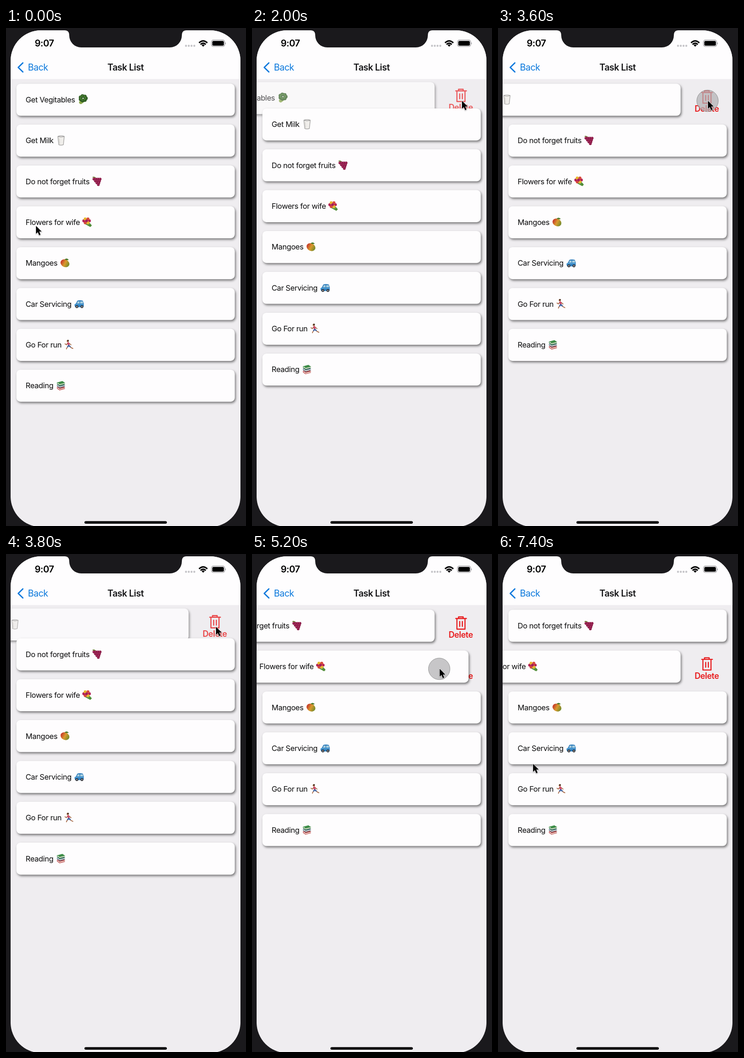
These frames come from a looping animation (520 by 1077 pixels, 7500 ms). An HTML page:

```html
<!DOCTYPE html>
<html lang="en">
<head>
<meta charset="utf-8">
<title>Task List</title>
<style>
  html, body { margin: 0; width: 100%; height: 100%; overflow: hidden; background: #1a191c; }
  svg { display: block; width: 100%; height: 100%; }
  text { font-family: Inter, "Open Sans", sans-serif; }
  .bold { font-weight: 600; letter-spacing: -.5px; text-anchor: middle; }
  .label { font-size: 16.4px; letter-spacing: -.4px; fill: #0c0c0d; }
  .card { fill: #fefdfe; filter: drop-shadow(2px 3.5px 2.5px rgba(0, 0, 0, .5)); }
  .line { fill: none; stroke-linecap: round; stroke-linejoin: round; }
  #pointer { filter: drop-shadow(0 1px 1px rgba(0, 0, 0, .3)); }
</style>
</head>
<body>
<svg viewBox="0 0 520 1077">
  <defs>
    <clipPath id="screen"><rect x="10" y="5" width="498" height="1074" rx="66"/></clipPath>
    <linearGradient id="mangoSkin">
      <stop offset=".1" stop-color="#c9442c"/>
      <stop offset=".5" stop-color="#d99a2d"/>
      <stop offset="1" stop-color="#6f8a2b"/>
    </linearGradient>
  </defs>
  <rect width="520" height="1077" fill="#1a191c"/>
  <g clip-path="url(#screen)">
    <rect x="10" width="498" height="1077" fill="#efedf0"/>
    <g id="list"></g>
    <rect x="10" width="498" height="110.5" fill="#fefdfe"/>
    <path d="M127 0V5Q137 5 137 16A26 26 0 0 0 163 42H355A26 26 0 0 0 381 16Q381 5 391 5V0Z" fill="#1a191c"/>
    <text x="83" y="40.3" font-size="20" class="bold">9:07</text>
    <path d="M390 38.5H409" class="line" stroke="#c5c4c8" stroke-width="4.4" stroke-dasharray="0 6"/>
    <g fill="none" stroke="#000" stroke-width="3">
      <path d="M418.2 32.2Q427.2 23.6 436.2 32.2M421.5 35.6Q427.2 30.2 432.9 35.6"/>
      <path d="M423.8 37Q427.2 34.2 430.6 37L427.2 40.6Z" fill="#000" stroke="none"/>
    </g>
    <rect x="445.2" y="26.2" width="28.6" height="13.8" rx="4" fill="none" stroke="#8d8c90" stroke-width="1.2"/>
    <rect x="447" y="28" width="25" height="10.2" rx="2.5"/>
    <path d="M475.2 31Q477.5 33 475.2 35.5Z" fill="#8d8c90"/>
    <path d="M36.5 75.5L26.5 85.3L36.5 95" class="line" stroke="#0a78dc" stroke-width="2.8"/>
    <text x="47.5" y="92.2" font-size="19.5" letter-spacing="-.5" fill="#0a78dc">Back</text>
    <text x="259" y="92.2" font-size="19.5" class="bold" fill="#151517">Task List</text>
    <rect x="170" y="1066.5" width="178.5" height="5.500" rx="2.75"/>
    <circle id="touch" r="23.3" fill="#b3b2b5" fill-opacity=".72" stroke="#777" stroke-opacity=".7"/>
    <path id="pointer" d="M0 0V17L4 13.4L6.8 20.2L9.8 19L7 12.3H12.3Z" stroke="#fff" stroke-width="1.3" paint-order="stroke"/>
  </g>
</svg>
<script>
const LOOP = 7500, FRAME = 100, PITCH = 88.35, OPEN = 100;
const SLIDE = 350, DRAG = 230, PRESS = 150, COLLAPSE_DELAY = 171, COLLAPSE = 300;

const repeat = (n, draw) => Array.from({ length: n }, (_, i) => draw(i)).join('');
const dot = (x, y, r, fill) => `<circle cx="${x}" cy="${y}" r="${r}" fill="${fill}"/>`;
const shape = (fill, d) => `<path d="${d}" fill="${fill}"/>`;
const line = (color, width, d) => `<path d="${d}" class="line" stroke="${color}" stroke-width="${width}"/>`;
const ring = (n, cx, cy, spread, r, ...colors) => repeat(n, i => {
  const angle = i * 2 * Math.PI / n;
  return dot(cx + spread * Math.cos(angle), cy + spread * .8 * Math.sin(angle), r, colors[i % colors.length]);
});

// Each icon fits a 22 x 22 box.
const icons = {
  broccoli: shape('#88a647', 'M7 9L3 17Q5 22 9 20L18 13Z')
    + ring(7, 12, 8, 6, 4, '#2f5d24') + ring(7, 11.5, 7, 5.5, 2, '#477b30'),
  milk: shape('#f0eeeb', 'M4 2H18L16 20Q11 22 6 20Z')
    + line('#9d9c9b', 1.2, 'M4 2L6 20Q11 22 16 20L18 2Q11 4.500 4 2Q11 -.5 18 2')
    + line('#d5d2ce', 1.4, 'M7 7L8 18'),
  grapes: line('#6d7a35', 2, 'M2 2Q6 1 8 5')
    + repeat(4, row => repeat(4 - row, col => {
      const x = 4 + 4.5 * col + 3.2 * row, y = 6 + 4 * row;
      return dot(x, y, 3, '#8d1c49') + dot(x - .8, y - .8, 1.1, '#b83d6e');
    })),
  bouquet: repeat(3, i => line('#4d8b35', 2.2, `M${6 + 3 * i} ${14 - 2 * i}L${17 + i} ${20 - i}`))
    + ring(6, 9, 8, 6, 3.2, '#b52355', '#e6b62d', '#d84a3d') + dot(9, 8, 3, '#a31f58'),
  mango: '<ellipse cx="11" cy="11.5" rx="10" ry="8" transform="rotate(28 11 11)" fill="url(#mangoSkin)"/>'
    + shape('#4c7a2a', 'M10 3Q15 -1 19 4Q14 6 10 3Z'),
  car: shape('#327fbd', 'M1 12L4 10L7 4Q12 2 19 4L21 10V16Q20 18 17 18H3Q1 17 1 12Z')
    + shape('#a9cfe0', 'M6 10L8 5.500H19L19.5 10Z') + line('#327fbd', 1.4, 'M12.500 5V10')
    + line('#5eb0e2', 1.2, 'M2 12H20')
    + repeat(2, i => dot(6 + 11 * i, 17, 3, '#29292d') + dot(6 + 11 * i, 17, 1.4, '#b5b7bb')),
  runner: line('#a86b49', 1.8, 'M8 7L5 11L2 9M10 7L15 11M10 13L7 16L5 20M11 13L15 17L19 19')
    + line('#d0476a', 4, 'M9 7.500L10 11') + line('#4669a5', 3, 'M8 15L10 12.500L13 15')
    + dot(8, 3, 2.4, '#a86b49') + dot(8.500, 2, 1.8, '#49301f'),
  books: ['#b8383b', '#4a6c83', '#3e8d48'].map((color, i) => {
    const y = 14 - 5 * i;
    return shape('#efe9dc', `M4 ${y + 2}L8 ${y + 6}L19 ${y + 3}V${y}Z`)
      + shape(color, `M3 ${y}L14 ${y - 3}L20 ${y + 1}L8 ${y + 4}Z`)
      + line(color, 1.2, `M3 ${y}V${y + 3}L8 ${y + 6.5}L19 ${y + 3.5}`);
  }).join('')
};

const tasks = [
  ['Get Vegitables', 'broccoli'], ['Get Milk', 'milk'], ['Do not forget fruits', 'grapes'],
  ['Flowers for wife', 'bouquet'], ['Mangoes', 'mango'], ['Car Servicing', 'car'],
  ['Go For run', 'runner'], ['Reading', 'books']
];
const swipes = [
  { task: 0, at: 400 }, { task: 1, at: 2600 }, { task: 2, at: 4430 },
  { task: 3, at: 5150, row: 1 }, { task: 2, at: 6450, closing: true }
];
const taps = [{ task: 0, at: 1700 }, { task: 1, at: 3520 }];

// The pointer passes through every gesture and a few places between them.
const stop = (t, x, y) => ({ t, x, y });
const route = [
  stop(0, 65, 428), stop(1400, 414, 158), stop(4300, 434, 176),
  stop(6300, 267, 157), stop(7200, 199, 323), stop(7400, 76, 454), stop(LOOP, 76, 454),
  ...swipes.flatMap(({ at, row = 0, closing }) => {
    const ends = closing ? [310, 400] : [420, 310];
    return ends.map((x, i) => stop(at + i * DRAG, x, 160 + row * PITCH));
  }),
  ...taps.flatMap(({ at }) => [stop(at - 100, 455, 157.5), stop(at + 400, 455, 157.5)])
].sort((a, b) => a.t - b.t);
const presses = [...swipes.map(({ at }) => [at, at + DRAG]), ...taps.map(({ at }) => [at, at + PRESS])];

const trash = line('#e81d1f', 2.4, 'M441.500 139.500H464.500M447.500 139V136H457.500V139M444 140V162.500H461.500V140M450 146V156.500M455.800 146V156.500');
const list = document.getElementById('list');
list.innerHTML = tasks.map(([label, icon]) => `<g>
  <g>${trash}<text x="452.3" y="181.3" font-size="18" class="bold" fill="#e81d1f">Delete</text></g>
  <g><rect class="card" x="22.5" y="120.5" width="473.2" height="69.3" rx="9"/>
    <text class="label" x="42.5" y="161">${label}</text>
    <g class="icon">${icons[icon]}</g></g>
</g>`).join('');
const rows = [...list.children];
const touch = document.getElementById('touch');
const pointer = document.getElementById('pointer');

const progress = (t, start, length) => Math.min(1, Math.max(0, (t - start) / length));
const smooth = p => p * p * (3 - 2 * p);
const easeOut = p => 1 - (1 - p) ** 2;
const move = (node, x, y) => node.setAttribute('transform', `translate(${x} ${y})`);
const show = (node, visible) => node.setAttribute('visibility', visible ? 'visible' : 'hidden');

rows.forEach(row => {
  const width = row.querySelector('.label').getComputedTextLength();
  move(row.querySelector('.icon'), 42.5 + width + 5.5, 144);
});

function pointerAt(t) {
  const i = route.findIndex(stop => stop.t > t);
  const from = route[i - 1], to = route[i];
  const p = smooth(progress(t, from.t, to.t - from.t));
  return [from.x + (to.x - from.x) * p, from.y + (to.y - from.y) * p];
}

function draw(t) {
  let y = 0;
  rows.forEach((row, i) => {
    const tap = taps.find(({ task }) => task === i);
    const gone = tap ? smooth(progress(t, tap.at + COLLAPSE_DELAY, COLLAPSE)) : 0;
    const shift = swipes.filter(({ task }) => task === i).reduce((sum, { at, closing }) =>
      sum + (closing ? OPEN : -OPEN) * easeOut(progress(t, at, SLIDE)), 0);
    move(row, 0, y - 9 * gone);
    row.setAttribute('opacity', 1 - gone ** 1.3);
    show(row.firstElementChild, shift < 0);
    move(row.lastElementChild, shift, 0);
    y += PITCH * (1 - gone);
  });
  const [px, py] = pointerAt(t);
  move(pointer, px, py);
  move(touch, px - 1, py);
  show(touch, presses.some(([start, end]) => t >= start && t < end));
}

function tick() {
  draw(Math.floor(performance.now() % LOOP / FRAME) * FRAME);
  requestAnimationFrame(tick);
}
tick();
</script>
</body>
</html>
```
